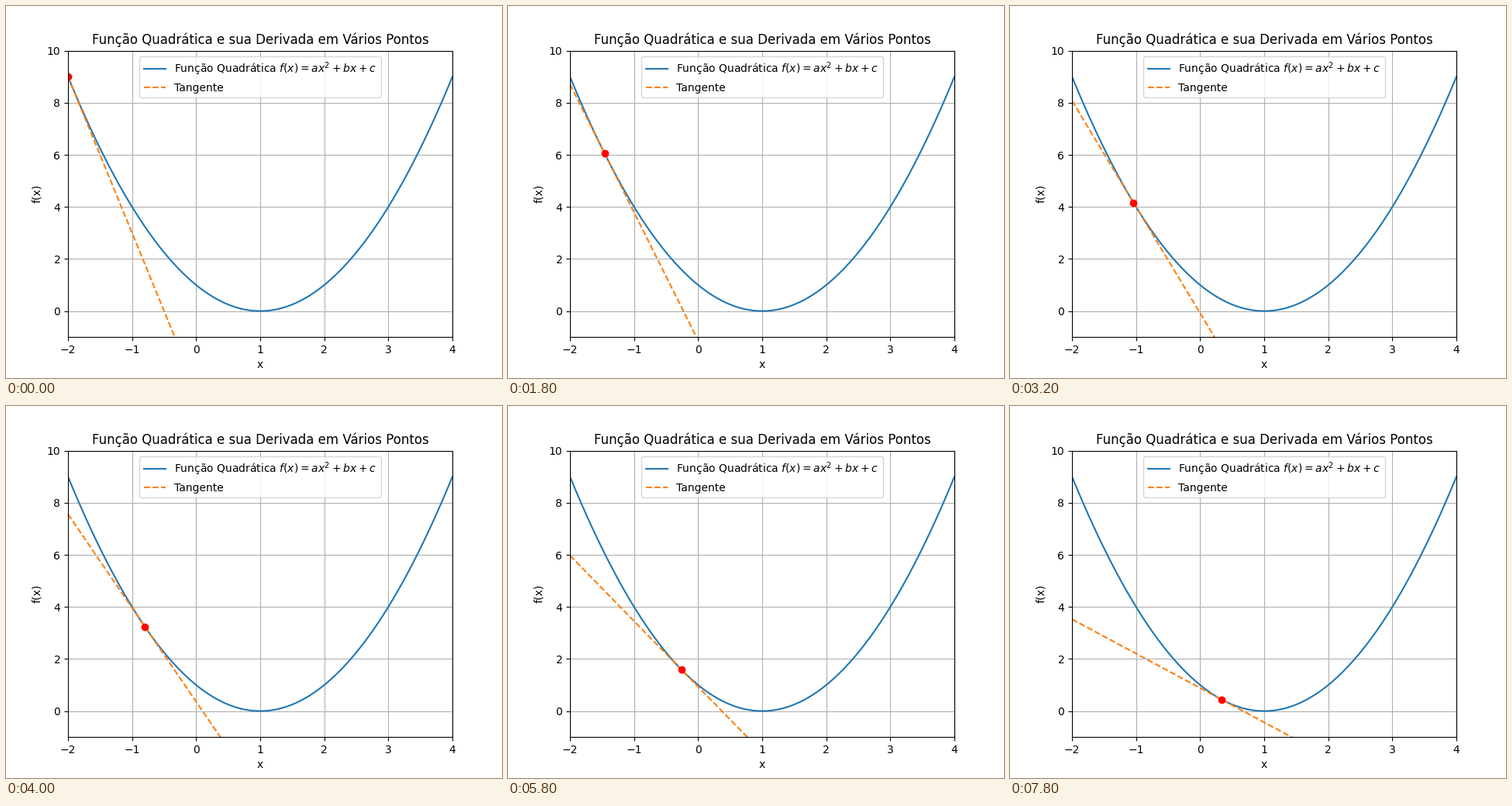
Animation, 640 px wide and 480 px high, one loop 8 s. Source, as a matplotlib script:

```python
import numpy as np
import matplotlib.pyplot as plt
from matplotlib.animation import FuncAnimation

A, B, C = 1, -2, 1
X_MIN, X_MAX = -2, 4
STEP = 0.06
FRAMES, INTERVAL = 40, 200


def f(x):
    return A * x**2 + B * x + C


def slope(x):
    return 2 * A * x + B


fig, ax = plt.subplots(figsize=(6.4, 4.8), dpi=100)
xs = np.linspace(X_MIN, X_MAX, 400)

ax.plot(xs, f(xs), label="Função Quadrática $f(x) = ax^2 + bx + c$")
tangent, = ax.plot([], [], "--", label="Tangente")
point, = ax.plot([], [], "ro")

ax.set_xlim(X_MIN, X_MAX)
ax.set_ylim(-1, 10)
ax.set_xlabel("x")
ax.set_ylabel("f(x)")
ax.set_title("Função Quadrática e sua Derivada em Vários Pontos")
ax.legend(loc="upper center")
ax.grid(True)


def update(i):
    x0 = X_MIN + STEP * i
    tangent.set_data(xs, f(x0) + slope(x0) * (xs - x0))
    point.set_data([x0], [f(x0)])
    return tangent, point


anim = FuncAnimation(fig, update, frames=FRAMES, interval=INTERVAL,
                     init_func=lambda: update(0), repeat=True, repeat_delay=0)
plt.show()
```
